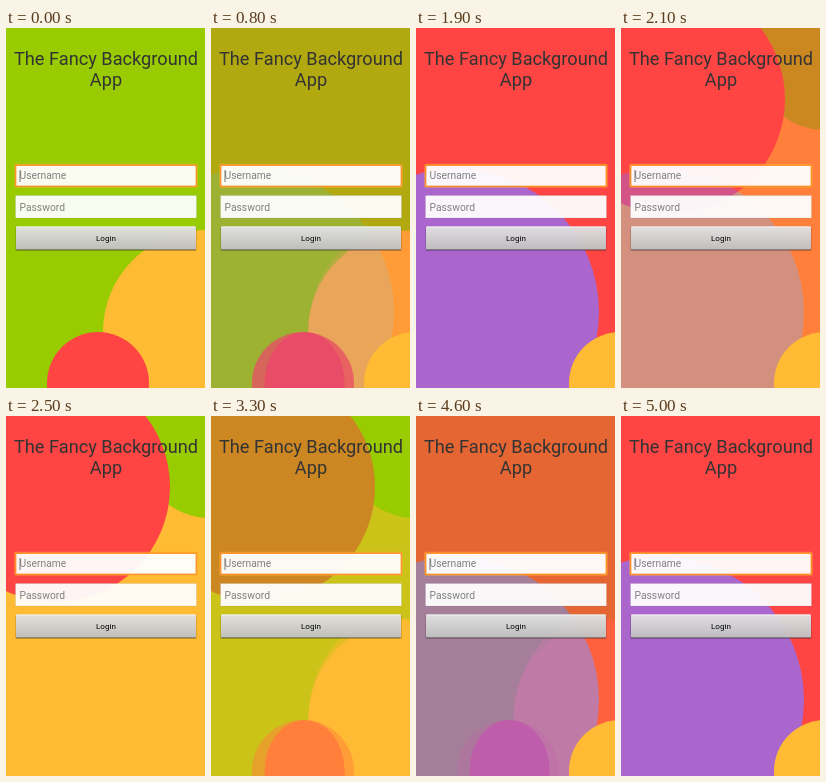
An HTML page for the animation above (5.1 s loop, 199 by 360 pixels).

```html
<!DOCTYPE html>
<html lang="en">
<head>
<meta charset="utf-8">
<title>Login</title>
<style>
  html, body { margin: 0; width: 100%; height: 100%; overflow: hidden; background: #99cc00; }
  svg { display: block; width: 199px; height: 360px; font-family: Roboto, sans-serif; }
  .title { font-size: 18.2px; fill: #333; text-anchor: middle; }
  .hint { font-size: 10.3px; fill: #808080; }
  .login { font-size: 8.1px; fill: #000; text-anchor: middle; }
</style>
</head>
<body>
<svg viewBox="0 0 199 360" width="199" height="360">
  <defs>
    <linearGradient id="metal" x1="0" y1="0" x2="0" y2="1">
      <stop offset="0" stop-color="#e6e6e6"/>
      <stop offset="1" stop-color="#c2c2c2"/>
    </linearGradient>
    <g id="greenScene">
      <rect x="-100" width="400" height="360" fill="#99cc00"/>
      <circle cx="199" cy="304" r="102" fill="#ffbb33"/>
      <circle cx="92" cy="355" r="51" fill="#ff4444"/>
    </g>
  </defs>

  <use href="#greenScene" transform="translate(99.5 0) scale(.785 1) translate(-99.5 0)"/>
  <use href="#greenScene" id="green"/>
  <g id="red">
    <rect width="199" height="360" fill="#ff4444"/>
    <circle cx="40" cy="284" r="143" fill="#aa66cc"/>
    <circle cx="204" cy="355" r="51" fill="#ffbb33"/>
  </g>
  <g id="orange">
    <rect width="199" height="360" fill="#ffbb33"/>
    <circle cx="204" cy="31" r="71" fill="#99cc00"/>
    <circle cx="49" cy="71" r="115" fill="#ff4444"/>
  </g>

  <text class="title" x="100" y="37">The Fancy Background</text>
  <text class="title" x="100" y="58">App</text>

  <rect x="9" y="136.5" width="182" height="22.5" rx="1" fill="none" stroke="#ffa83c" stroke-opacity=".6" stroke-width="1.5"/>
  <rect x="9.75" y="137.25" width="180.5" height="21" fill="#fff" fill-opacity=".95" stroke="#ff8c1a" stroke-width="1.2"/>
  <text class="hint" x="13.5" y="151">Username</text>
  <rect id="caret" x="13.5" y="142" width="1" height="12" fill="#777"/>

  <rect x="9.5" y="167.5" width="181" height="22.5" fill="#fff" fill-opacity=".94" stroke="#777" stroke-opacity=".15"/>
  <text class="hint" x="13.5" y="182.5">Password</text>

  <rect x="9.5" y="199" width="181" height="24" rx="1" fill="#000" fill-opacity=".25"/>
  <rect x="10" y="198.5" width="180" height="23" rx="1" fill="url(#metal)" fill-opacity=".95"/>
  <path d="M10.5 199H189.5" stroke="#f4f4f4" stroke-opacity=".8"/>
  <path d="M10.5 221.5H189.5" stroke="#777" stroke-opacity=".7"/>
  <text class="login" x="100" y="213">Login</text>
</svg>
<script>
  const LOOP = 5100, STEP = 100, FADE = 400;
  const BLINK = 1250, BLINK_START = 750;
  const fades = [
    [700, 'green', 'red'],
    [1900, 'red', 'orange'],
    [3100, 'orange', 'green'],
    [4300, 'green', 'red']
  ];
  const byId = id => document.getElementById(id);
  const layers = { green: byId('green'), red: byId('red'), orange: byId('orange') };
  const caret = byId('caret');

  function draw(t) {
    const mix = { green: 0, red: 0, orange: 0 };
    const [start, from, to] = fades.filter(f => f[0] <= t).pop() || fades[0];
    const p = Math.min(1, Math.max(0, (t - start) / FADE));
    mix[from] = 1 - p;
    mix[to] = p;
    // The red scene stays opaque beneath the orange one.
    if (from === 'red' && p < 1) mix.red = 1;
    for (const name in layers) layers[name].style.opacity = mix[name];

    const phase = (t - BLINK_START + BLINK) % BLINK;
    caret.style.opacity = phase < BLINK / 2 ? 1 : 0;
  }

  const begin = performance.now();
  function tick() {
    const t = (performance.now() - begin) % LOOP;
    draw(Math.floor(t / STEP) * STEP);
    requestAnimationFrame(tick);
  }
  draw(0);
  requestAnimationFrame(tick);
</script>
</body>
</html>
```
